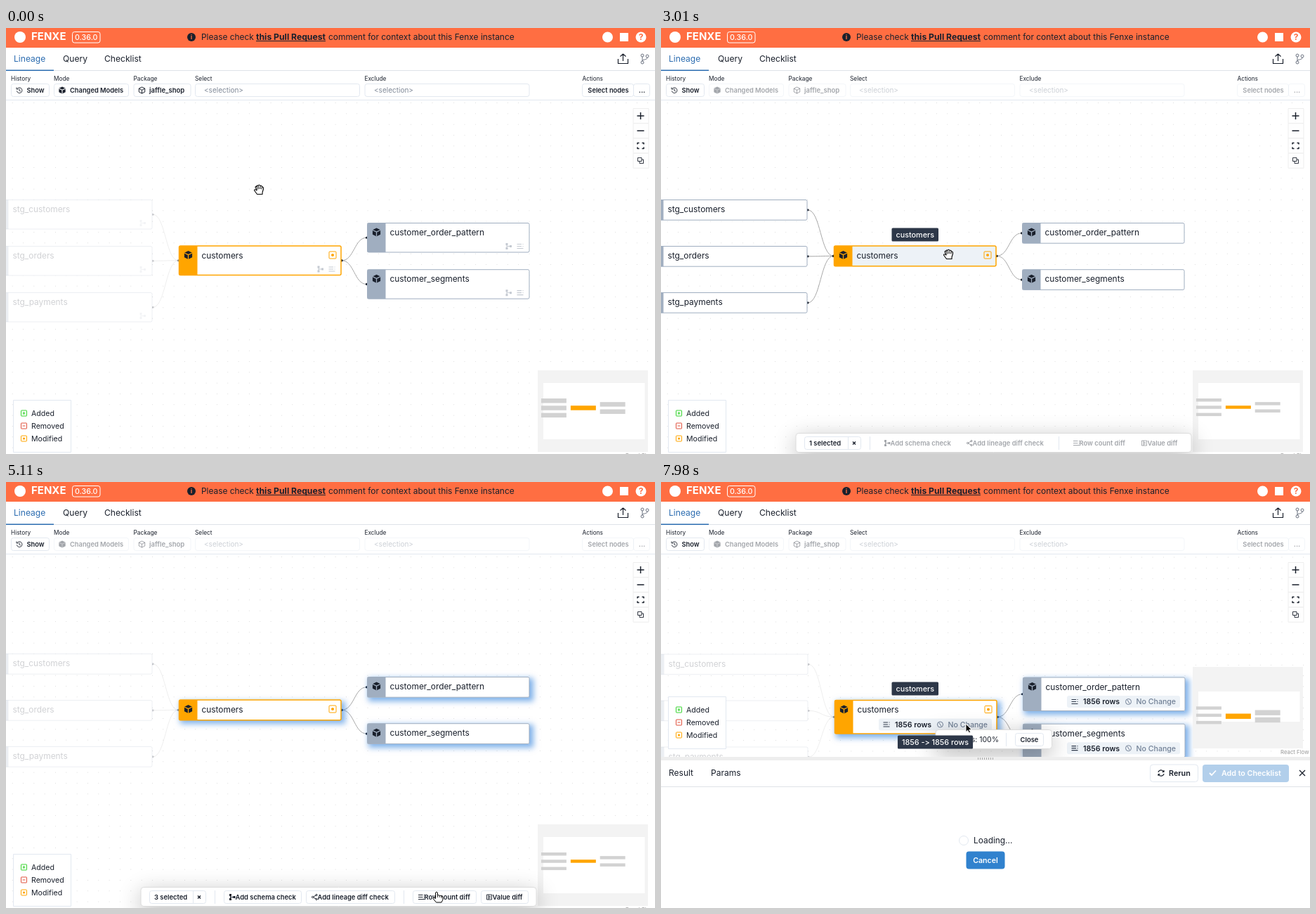
Recreate the animation shown at these times as an HTML page with a canvas. Size 924x606 px, loop 8000 ms.

```html
<!DOCTYPE html>
<html>
<head>
<meta charset="utf-8">
<style>
  html, body { margin: 0; width: 100%; height: 100%; overflow: hidden; background: #fff; }
  canvas { display: block; width: 924px; height: 606px; }
</style>
</head>
<body>
<canvas id="stage" width="924" height="606"></canvas>
<script>
const ctx = document.getElementById('stage').getContext('2d');
const LOOP = 8000, STEP = 70;
const DARK = '#1a202c', LINE = '#e2e8f0', ORANGE = '#ffa500', SLATE = '#a0aec0', BRAND = '#ff6e42', BLUE = '#3182ce';
const CLICK = 1470, RUN = 5460, DONE = 6160, PANEL = 7910;

const clamp = v => Math.max(0, Math.min(1, v));
const ramp = (t, from, to) => clamp((t - from) / (to - from));
const fade = (t, a, b, c, d) => ramp(t, a, b) * (1 - ramp(t, c, d));

// ---- drawing helpers ----
function setFont(size, weight = 400) { ctx.font = `${weight} ${size}px Inter, sans-serif`; }

function text(str, x, y, size, color = DARK, weight = 400, align = 'left') {
  setFont(size, weight);
  ctx.fillStyle = color;
  ctx.textAlign = align;
  ctx.fillText(str, x, y + size * 0.36);
}

function box(x, y, w, h, r, fill, stroke, width = 1) {
  ctx.beginPath();
  ctx.roundRect(x, y, w, h, r);
  if (fill) { ctx.fillStyle = fill; ctx.fill(); }
  if (stroke) { ctx.strokeStyle = stroke; ctx.lineWidth = width; ctx.stroke(); }
}

function rect(x, y, w, h, fill) { ctx.fillStyle = fill; ctx.fillRect(x, y, w, h); }

function circle(x, y, r, fill, stroke, width = 1) {
  ctx.beginPath();
  ctx.arc(x, y, r, 0, 7);
  if (fill) { ctx.fillStyle = fill; ctx.fill(); }
  if (stroke) { ctx.strokeStyle = stroke; ctx.lineWidth = width; ctx.stroke(); }
}

function icon(d, x, y, stroke, width = 1, fill) {
  ctx.save();
  ctx.translate(x, y);
  const path = new Path2D(d);
  if (fill) { ctx.fillStyle = fill; ctx.fill(path); }
  if (stroke) { ctx.strokeStyle = stroke; ctx.lineWidth = width; ctx.lineJoin = 'round'; ctx.stroke(path); }
  ctx.restore();
}

function withAlpha(alpha, draw) {
  if (alpha <= 0) return;
  ctx.save();
  ctx.globalAlpha *= alpha;
  draw();
  ctx.restore();
}

function cube(x, y, size, seam, outline) {
  ctx.save();
  ctx.translate(x, y);
  ctx.scale(size / 6, size / 6);
  icon('M0-6L5.6-3.3V3.3L0 6L-5.6 3.3V-3.3Z', 0, 0, outline ? DARK : null, 1.3, outline ? null : DARK);
  icon('M-5.6-3L0-.3L5.6-3M0-.3V6', 0, 0, outline ? DARK : seam, 1.3);
  ctx.restore();
}

const rowsIcon = (x, y, color) => icon('M-4.5-3H2M-4.5 0H2M-4.5 3H4.5M3.5-3H4.5M3.5 0H4.5', x, y, color, 1.2);
const schemaIcon = (x, y, color) =>
  icon('M-4-4.5H-1V-1.5H-4ZM-4 1.5H-1V4.5H-4ZM1.5-1.5H4.5V1.5H1.5ZM-3-1.5H-2V1.5H-3ZM-2-.4H2V.4H-2Z', x, y, null, 1, color);

// ---- lineage graph ----
const W = 230.5;
const nodes = {
  stgC: { x: -22.5, y: 244.5, name: 'stg_customers', stg: true },
  stgO: { x: -22.5, y: 310.5, name: 'stg_orders', stg: true },
  stgP: { x: -22.5, y: 376.5, name: 'stg_payments', stg: true },
  cust: { x: 246.5, y: 310, name: 'customers', color: ORANGE, picked: 2940 },
  order: { x: 514.5, y: 277.5, name: 'customer_order_pattern', picked: 3710 },
  seg: { x: 514.5, y: 343.7, name: 'customer_segments', picked: 4340 },
};
const edges = [['stgC', 'cust'], ['stgO', 'cust'], ['stgP', 'cust'], ['cust', 'order'], ['cust', 'seg']];

// [node, hover start, hover end, tooltip in, tooltip out]
const hovers = [
  ['cust', 2590, 3150, 2590, 3080],
  ['order', 3200, 3990, 3230, 3820],
  ['seg', 4060, 4620, 4100, 4600],
  ['cust', 7210, 7840, 7560, 9000],
];

const hoveredAt = t => (hovers.find(h => t >= h[1] && t < h[2]) || [])[0];

function isBright(key, hover) {
  if (nodes[key].stg) return !!hover;
  return !(hover === 'order' && key === 'seg') && !(hover === 'seg' && key === 'order');
}

function heightOf(node, t) {
  if (t < CLICK) return 41.5;
  if (node.stg || t < RUN) return 28.7;
  return t < DONE ? 41.5 : 47.5;
}

function drawEdge(from, to, t, alpha) {
  const x1 = from.x + W + 1, y1 = from.y + heightOf(from, t) / 2;
  const x2 = to.x - 1, y2 = to.y + heightOf(to, t) / 2, mid = (x1 + x2) / 2;
  withAlpha(alpha, () => {
    icon(`M${x1} ${y1}C${mid} ${y1} ${mid} ${y2} ${x2} ${y2}`, 0, 0, '#a8a8a8');
    circle(x1, y1, 1.6, DARK);
    circle(x2, y2, 1.6, DARK);
  });
}

function drawGlow(x, y, h, strength) {
  ctx.save();
  ctx.shadowColor = `rgba(3,102,214,${0.5 * strength})`;
  ctx.shadowBlur = 8;
  ctx.shadowOffsetX = 2000 + 3.5;
  ctx.shadowOffsetY = 3.5;
  rect(x - 2 - 2000, y - 2, W + 4, h + 4, '#000');
  ctx.restore();
}

function modifiedIcon(x, y, s) {
  box(x - s, y - s, s * 2, s * 2, 1, null, ORANGE);
  circle(x, y, s * 0.4, ORANGE);
}

function drawNode(key, t, hover) {
  const node = nodes[key], { x, y } = node, h = heightOf(node, t), color = node.color || SLATE;
  if (node.picked) drawGlow(x, y, h, ramp(t, node.picked + 70, node.picked + 280));
  rect(x, y, W, h, '#fff');
  withAlpha(isBright(key, hover) ? 1 : 0.2, () => {
    box(x, y, W, h, 2, hover === key ? '#edf2f7' : '#fff', color, node.color ? 1.5 : 1);
    rect(x, y, 26, h, color);
    if (!node.stg) cube(x + 13, y + 13, 6, color);
    text(node.name, x + 32, y + 13.5, 11.9);
    if (node.color) modifiedIcon(x + 218.5, y + 13, 5);
    if (t < CLICK) {
      schemaIcon(x + 201 + (node.stg ? 16 : 0), y + 33, '#c4c9d1');
      if (!node.stg) rowsIcon(x + 217.5, y + 33, '#c4c9d1');
    }
    if (!node.stg && t >= RUN && t < DONE) circle(x + 218, y + 32, 4, null, LINE, 1.5);
    if (!node.stg && t >= DONE) {
      box(x + 62.5, y + 26, 161, 17, 3, '#edf2f7');
      rowsIcon(x + 73.5, y + 34.5, '#2d3748');
      text('1856 rows', x + 85.5, y + 34.5, 10.6, DARK, 600);
      circle(x + 150, y + 34.5, 4, null, '#718096');
      icon('M-1.5-2.5L1.5 2.5', x + 150, y + 34.5, '#718096');
      text('No Change', x + 161, y + 34.5, 10.6, '#718096', 500);
    }
  });
}

function tooltip(str, cx, cy, alpha) {
  // Split "->" so the font does not join it into one arrow.
  const parts = str.split(/(?<=-)(?=>)/);
  withAlpha(alpha, () => {
    setFont(10.8, 500);
    const widths = parts.map(p => ctx.measureText(p).width);
    const w = widths.reduce((a, b) => a + b) + 12;
    box(cx - w / 2, cy - 9.5, w, 19, 1.5, '#2d3748');
    let x = cx - w / 2 + 6;
    parts.forEach((part, i) => {
      text(part, x, cy, 10.8, '#fff', 500);
      x += widths[i];
    });
  });
}

function drawGraph(t) {
  const hover = hoveredAt(t);
  for (const [a, b] of edges) drawEdge(nodes[a], nodes[b], t, isBright(a, hover) && isBright(b, hover) ? 1 : 0.2);
  for (const key in nodes) drawNode(key, t, hover);
}

function drawTooltips(t) {
  for (const [key, , , start, end] of hovers) {
    const n = nodes[key];
    tooltip(n.name, n.x + W / 2, n.y - 16, fade(t, start, start + 130, end, end + 125));
  }
  tooltip('1856 -> 1856 rows', 390.5, 370, ramp(t, 7560, 7700));
}

// ---- canvas overlays ----
function drawDots(gap = 15.33) {
  for (let x = -21.5; x < 924; x += gap)
    for (let y = 244.5 - 9 * gap; y < 606; y += gap) rect(x - 0.4, y - 0.4, 0.8, 0.8, '#ccc');
}

function drawControls() {
  const marks = ['M-5 0H5M0-5V5', 'M-5 0H5', 'M-4.5-2V-4H-2M2-4H4.5V-2M4.5 2V4H2M-2 4H-4.5V2',
    'M-4-4H1.5V1H-4ZM-1.5 1V4H4V-1.5H1.5'];
  marks.forEach((d, i) => {
    rect(893, 115 + i * 21.2, 22, 21, '#fefefe');
    box(893, 114.5 + i * 21.2, 22, 21.2, 0, null, '#eee');
    icon(d, 903.5, 125 + i * 21.2, DARK, i < 3 ? 1.5 : 0.9);
  });
}

function drawMinimap(t, open) {
  const top = open ? 263 : 487, drop = open ? -207.7 : 0, k = 0.156;
  rect(757, top, 157, 116, '#f3f3f3');
  rect(765, open ? 298 : 505, 144.5, open ? 43 : 80, '#fff');
  for (const n of Object.values(nodes))
    rect(762 + (n.x + 22) * k, 527 + (n.y - 244.5) * k + drop, W * k, heightOf(n, t) * k, n.color || '#d2d2d2');
}

function drawLegend(dy) {
  box(10.5, 529.5 + dy, 82, 74, 0, '#fff', LINE);
  [['Added', '#38d430', 'M-2 0H2M0-2V2'], ['Removed', '#e0523f', 'M-2 0H2'], ['Modified', ORANGE]].forEach(([label, color, mark], i) => {
    const y = 548 + i * 18 + dy;
    if (mark) {
      box(21.5, y - 4, 8, 8, 0.5, null, color);
      icon(mark, 25.5, y, color);
    } else modifiedIcon(25.5, y, 4);
    text(label, 36, y, 10.6);
  });
}

function floatingBar(x, w, y) {
  ctx.save();
  ctx.shadowColor = 'rgba(0,0,0,.3)';
  ctx.shadowBlur = 32;
  ctx.shadowOffsetY = 8;
  box(x, y, w, 27, 4, '#fff');
  ctx.restore();
  box(x, y, w, 27, 4, '#fff', '#dcdcdc');
}

function drawActionBar(t) {
  const rise = ramp(t, CLICK, CLICK + 210), count = Object.values(nodes).filter(n => t >= n.picked).length;
  ctx.save();
  ctx.translate(0, 30 * (1 - rise));
  ctx.globalAlpha = rise;
  floatingBar(192, 563, 576.5);
  box(204.5, 581.5, 80, 18, 3, null, LINE);
  rect(266, 581, 1, 18, LINE);
  text(`${count} selected`, 211, 590.5, 9.4, DARK, 600);
  icon('M-2-2L2 2M2-2L-2 2', 275, 590.5, DARK, 1.4);
  rect(297, 581, 1, 19, LINE);
  rect(566, 581, 1, 19, LINE);
  withAlpha(t >= 3080 ? 1 : 0.4, () => {
    const buttons = [[310.5, 110, 'Add schema check'], [427.5, 126, 'Add lineage diff check'], [579.5, 90, 'Row count diff'], [676.5, 67, 'Value diff']];
    for (const [x, w, label] of buttons) {
      if (t >= 3080) box(x, 581.5, w, 18, 3, null, LINE);
      text(label, x + 16, 590.5, 9.4, DARK, 600);
    }
    schemaIcon(322, 590.5, DARK);
    icon('M-2 0L3-3M-2 0L3 3', 439, 590.5, DARK);
    for (const [x, y] of [[436.5, 590.5], [442, 587.5], [442, 593.5]]) circle(x, y, 1.1, '#fff', DARK);
    rowsIcon(591.5, 590.5, DARK);
    icon('M-3.5-3.5H3.5V3.5H-3.5ZM-1-3.5V3.5M-1-1H2M-1 1.2H2', 688, 590.5, DARK, 0.9);
  });
  ctx.restore();
}

function drawProgress(t, dy) {
  floatingBar(391, 165.5, 576.5 + dy);
  text(`Progress: ${t < DONE ? 0 : 100}%`, 403, 590 + dy, 10.5);
  rect(491, 581 + dy, 1, 19, LINE);
  box(504.5, 581.5 + dy, 40, 18, 3, null, LINE);
  text('Close', 524.5, 590.5 + dy, 9.4, DARK, 600, 'center');
}

// ---- page chrome ----
function drawHeader() {
  rect(0, 0, 924, 28, BRAND);
  circle(20, 13, 8, '#fff');
  text('FENXE', 36, 12, 15, '#fff', 700);
  box(94.5, 5.5, 39.5, 15.5, 3, null, '#fff');
  text('0.36.0', 98, 13, 10.7, '#fff', 500);
  circle(264, 13, 6, DARK);
  text('i', 264, 13, 9, BRAND, 700, 'center');
  text('Please check', 278, 13, 11.9);
  text('this Pull Request', 356, 13, 12.2, DARK, 700);
  rect(356, 18, 99, 1, DARK);
  text('comment for context about this Fenxe instance', 459, 13, 11.95);
  circle(856.5, 13, 7.5, '#fff');
  rect(874, 7, 12, 12, '#fff');
  circle(904, 13, 7.5, '#fff');
  text('?', 904, 13, 12, BRAND, 700, 'center');

  rect(0, 28, 924, 75, '#fff');
  rect(0, 60, 924, 1, '#dfe3e8');
  rect(0, 59.5, 68, 1.5, '#2b6cb0');
  text('Lineage', 11, 44, 12.1, '#2b6cb0');
  text('Query', 81, 44, 12.1);
  text('Checklist', 140, 44, 12.1);
  icon('M-7 0V6.5H7V0M0 3V-7M-4-3.5L0-7L4-3.5', 878.5, 44, DARK, 1.2);
  icon('M-3.5-3V3M3.5-2C3.5 2-3.5 0-3.5 3', 909.5, 44, '#6b7280');
  for (const [x, y] of [[906, 39], [913, 40], [906, 49]]) circle(x, y, 2, '#fff', '#6b7280');
}

function drawToolbar(t) {
  const labels = [['History', 7], ['Mode', 68], ['Package', 181.5], ['Select', 269], ['Exclude', 510.5], ['Actions', 820.5]];
  for (const [label, x] of labels) text(label, x, 72, 8.3);
  rect(0, 102, 924, 1, LINE);
  box(7.5, 79.5, 54, 18, 3, null, LINE);
  icon('M-3-2A3.8 3.8 0 1 1-3.6 1M-4-4V-1.5H-1.5M0-2V.5L1.8 1.5', 19, 88.5, DARK, 0.9);
  text('Show', 29.5, 88.5, 9.3, DARK, 600);
  withAlpha(1 - 0.6 * ramp(t, CLICK, CLICK + 210), () => {
    for (const [x, w] of [[68.5, 106], [182, 81], [269.5, 234], [511, 234], [820.5, 73], [893.5, 23]]) box(x, 79.5, w, 18, 3, null, LINE);
    cube(80, 88.5, 5, '#fff');
    text('Changed Models', 91, 88.5, 9.3, DARK, 600);
    cube(193.5, 88.5, 4.5, null, true);
    text('jaffle_shop', 204, 88.5, 9.5, DARK, 600);
    text('<selection>', 282, 88.5, 10, '#808a98');
    text('<selection>', 524, 88.5, 10, '#808a98');
    text('Select nodes', 857.5, 88.5, 9.3, DARK, 600, 'center');
    text('...', 905.5, 88, 10, DARK, 600, 'center');
  });
}

function drawPanel() {
  rect(0, 391, 924, 215, '#fff');
  rect(0, 391, 924, 5, '#eee');
  for (let x = 451; x < 474; x += 3) rect(x, 392, 1, 3, '#aaa');
  text('Result', 11, 414, 12);
  text('Params', 71, 414, 12);
  rect(0, 433, 924, 1, '#dfe3e8');
  box(696.5, 402, 68, 24.5, 4, null, LINE);
  icon('M-4-1A4 4 0 0 1 3.5-2M4-4V-1.5H1.5M4 1A4 4 0 0 1-3.5 2M-4 4V1.5H-1.5', 712, 414, DARK, 1.2);
  text('Rerun', 723, 414, 10.8, DARK, 600);
  box(771, 402, 123, 25, 4, '#b2cfeb');
  icon('M-4 0L-1 3L5-3.5', 785, 414, '#fff', 1.8);
  text('Add to Checklist', 798, 414, 10.7, '#fff', 600);
  icon('M-4-4L4 4M4-4L-4 4', 913, 414, DARK, 1.3);
  circle(431, 510, 6.5, null, LINE);
  text('Loading...', 445, 510, 11.9);
  box(434.5, 525.5, 55, 25, 4, BLUE);
  text('Cancel', 462, 538, 10.6, '#fff', 600, 'center');
}

// ---- mouse ----
const track = [
  [490, 360, 230], [1260, 886, 88], [1470, 886, 88], [1820, 887, 91], [2240, 598, 42], [2730, 409, 322],
  [3010, 409, 322], [3500, 575, 292], [3640, 575, 292], [3920, 571, 317], [4130, 585, 356], [4480, 585, 356],
  [5080, 613, 583], [5460, 613, 583], [5461, 617, 589], [6720, 617, 589], [7560, 434, 344],
];

function mouseAt(t) {
  const i = track.findIndex(k => k[0] > t);
  if (i === 0) return track[0].slice(1);
  if (i < 0) return track[track.length - 1].slice(1);
  const [t0, x0, y0] = track[i - 1], [t1, x1, y1] = track[i];
  const p = 0.5 - Math.cos(Math.PI * (t - t0) / (t1 - t0)) / 2;
  return [x0 + (x1 - x0) * p, y0 + (y1 - y0) * p];
}

function drawMouse(t) {
  const [x, y] = mouseAt(t);
  const arrow = () => icon('M0 0V11.5L2.7 9.2L4.6 13L6.6 12.1L4.8 8.4H8.3Z', x, y, '#fff', 1, '#000');
  const overBar = y > 577 && t < RUN;
  if (y < 60 || t >= 7420) arrow();
  else if (y < 103 && t >= CLICK) {
    circle(x + 8, y + 19, 7, '#eee', '#999', 2);
    icon('M-5-5L5 5', x + 8, y + 19, '#999', 2);
    arrow();
  } else if (y < 103 || overBar) {
    icon('M-1.4 1Q0-.8 1.4 1V5Q3 4 4.2 5.4Q6 4.7 7 6.2Q9 6 9 8V11L7 15H-.5L-5 9.5Q-5 7.2-1.4 9.5Z', x, y, '#000', 1, '#fff');
    icon('M1.4 5V8M4.2 5.4V8M7 6.2V9', x, y, '#000', 0.8);
  } else {
    icon('M-3 0L-5-3.5Q-4.4-5.8-2.8-4.2Q-3-7-1-5.6Q.7-8 2-5.4Q4.2-6.6 4.5-3.8Q6.8-4.5 6.5-1L5 4V6.5H-2.5L-6.5 1Q-6.5-1.6-3 1Z', x, y, '#000', 1.1, '#fff');
    icon('M-2.8-4L-1.4-.5M-.8-5.2L.3-1M2-5L2.2-1M4.5-3.6L4-.6', x, y, '#000', 0.9);
  }
}

function draw(t) {
  const open = t >= PANEL, dy = open ? -224 : 0;
  rect(0, 0, 924, 606, '#fff');
  ctx.save();
  if (open) ctx.translate(1, 0.5);
  drawDots();
  drawGraph(t);
  ctx.restore();
  drawControls();
  drawMinimap(t, open);
  text('React Flow', 882, 384 + (open ? 0 : 224), 7.8, '#999');
  drawLegend(dy);
  if (t >= RUN) drawProgress(t, dy);
  else if (t >= CLICK) drawActionBar(t);
  drawTooltips(t);
  if (open) drawPanel();
  drawHeader();
  drawToolbar(t);
  drawMouse(t);
}

function tick() {
  draw(Math.floor((performance.now() % LOOP) / STEP) * STEP);
  requestAnimationFrame(tick);
}
tick();
</script>
</body>
</html>
```
